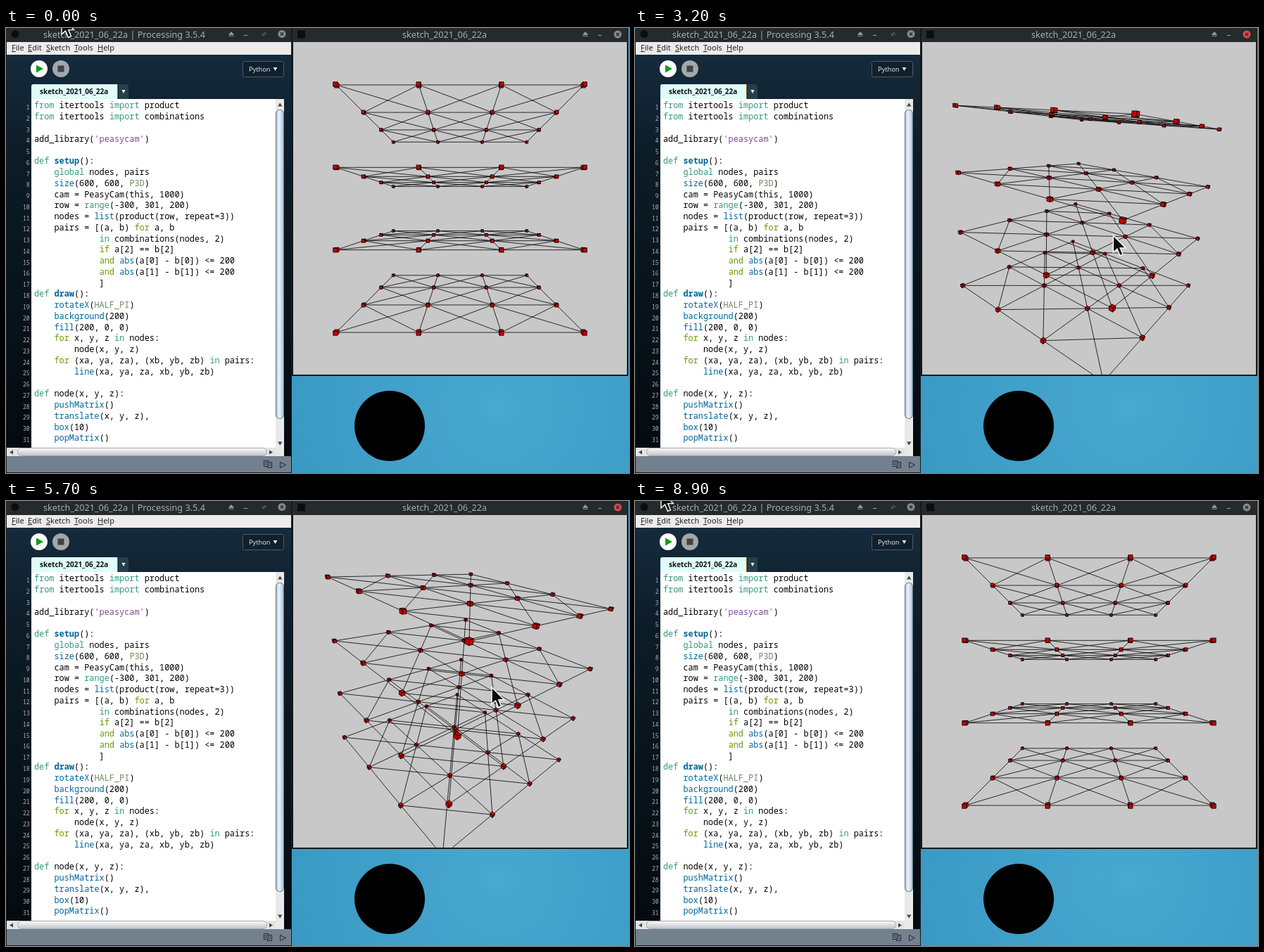
Animation of 885x633 px, one loop 9000 ms. Source, as an HTML page with a canvas:

```html
<!DOCTYPE html>
<html lang="en">
<head>
<meta charset="utf-8">
<title>Lattice sketch</title>
<style>
  html, body { margin: 0; width: 885px; height: 633px; overflow: hidden; background: #3b99c4; }
  svg, canvas, pre { position: absolute; left: 0; top: 0; margin: 0; }
  text { font-family: "Noto Sans", "Open Sans", sans-serif; }
  pre { font: 11.88px/15.77px "Noto Sans Mono", "DejaVu Sans Mono", monospace; color: #000; }
  #code { left: 40px; top: 102.4px; }
  #nums { top: 105px; width: 33.5px; text-align: right; font-size: 8px; color: #a9b6bd; }
  .word { color: #33997e; }
  .flow { color: #669900; }
  .call { color: #006699; }
  .main { color: #006699; font-weight: bold; }
  .name { color: #718a62; }
  .str { color: #7d4793; }
</style>
</head>
<body>
<svg width="885" height="633">
  <defs>
    <radialGradient id="desk" gradientUnits="userSpaceOnUse" cx="700" cy="540" r="330">
      <stop offset="0" stop-color="#48a8d0"/><stop offset="1" stop-color="#3998c2"/>
    </radialGradient>
    <linearGradient id="navy" x2="0" y2="1">
      <stop offset="0" stop-color="#152b3d"/><stop offset=".25" stop-color="#0c1c27"/><stop offset="1" stop-color="#040a0f"/>
    </linearGradient>
    <linearGradient id="thumb">
      <stop offset="0" stop-color="#a9bccb"/><stop offset=".4" stop-color="#edf5fb"/><stop offset="1" stop-color="#a5c0d6"/>
    </linearGradient>
    <linearGradient id="thumbH" x2="0" y2="1">
      <stop offset="0" stop-color="#fafafa"/><stop offset="1" stop-color="#bfc3c8"/>
    </linearGradient>
    <g id="tools" stroke="#9ba0a2" fill="none">
      <path d="M-49.500 9.500l3.500-4 3.500 4zM-49.500 11.500h7" fill="#9ba0a2" stroke-width=".8"/>
      <path d="M-28 10.500h5"/>
    </g>
  </defs>
  <rect width="885" height="633" fill="url(#desk)"/>
  <circle cx="545" cy="566" r="50" fill="#000"/>

  <!-- editor window -->
  <rect width="406" height="633" fill="#14191c"/>
  <rect width="405" height="20" fill="#252a2d"/>
  <circle cx="13" cy="8.500" r="5.500" fill="#0c0d0e"/>
  <text x="53" y="14" font-size="12.65" fill="#a9aeb0">sketch_2021_06_22a | Processing 3.5.4</text>
  <use href="#tools" x="366"/>
  <path d="M364.500 10.500l4-3.500M364.500 7.500v3h3M369 10V7h-3" stroke="#6d7274" stroke-width=".8" fill="none"/>
  <circle cx="392" cy="8.500" r="5.500" fill="#85898b"/>
  <path d="M390 6.500l4 4m0-4l-4 4" stroke="#252a2d" stroke-width="1.300"/>

  <rect x="1" y="20" width="404" height="18" fill="#edecea"/>
  <g font-size="11" fill="#222">
    <text x="8" y="32"><tspan text-decoration="underline">F</tspan>ile</text>
    <text x="31" y="32"><tspan text-decoration="underline">E</tspan>dit</text>
    <text x="57" y="32"><tspan text-decoration="underline">S</tspan>ketch</text>
    <text x="97" y="32"><tspan text-decoration="underline">T</tspan>ools</text>
    <text x="130" y="32"><tspan text-decoration="underline">H</tspan>elp</text>
  </g>

  <rect x="1" y="38" width="404" height="571" fill="url(#navy)"/>
  <circle cx="47" cy="58" r="12" fill="#fff"/>
  <path d="M43 52.500l10 5.500-10 5.500z" fill="#0a9f16"/>
  <circle cx="78" cy="58" r="12" fill="#a3a7aa"/>
  <rect x="73.500" y="53.500" width="9" height="9" fill="#3f4346"/>
  <rect x="336.500" y="47.500" width="58" height="22" rx="2" fill="#10202c" stroke="#4c5c68"/>
  <text x="345" y="62" font-size="9.200" fill="#e0e5e8">Python</text>
  <path d="M379.500 56h6l-3 5z" fill="#e0e5e8"/>
  <path d="M36 101V83q0-3 3-3h119v21z" fill="#dffcf8"/>
  <path d="M158.500 80v21" stroke="#a5672b"/>
  <path d="M160 80h11q3 0 3 3v18h-14z" fill="#24404f"/>
  <path d="M164.500 88h5l-2.500 5z" fill="#fff"/>
  <text x="48" y="94" font-size="10" font-weight="bold" fill="#111">sketch_2021_06_22a</text>

  <rect x="36" y="101" width="347" height="497" fill="#fff"/>
  <rect x="383" y="101" width="12" height="508" fill="#e9e9e9"/>
  <rect x="383.500" y="116.500" width="11" height="439" rx="5" fill="url(#thumb)" stroke="#5f7486"/>
  <path d="M386 111.500h6.500l-3.250-5zM386 588.500h6.500l-3.250 5z" fill="#444"/>
  <rect x="1" y="597" width="382" height="12" fill="#e4e4e4"/>
  <rect x="16.500" y="597.500" width="354" height="11" rx="5" fill="url(#thumbH)" stroke="#a4a8ac"/>
  <path d="M10 600.500v6l-5-3zM374 600.500v6l5-3z" fill="#444"/>
  <rect x="1" y="609" width="404" height="23" fill="#73808e"/>
  <g fill="none" stroke="#1f2a33">
    <path d="M366.500 615.500h6v8h-6zM372.500 617.500h5v8h-6v-2M368 618h3M368 620.500h3M374 620h2M374 622.500h2"/>
    <path d="M389.500 617.500v8l8-4z"/>
  </g>

  <!-- sketch window -->
  <rect x="406" width="478" height="495" fill="#14191c"/>
  <rect x="407" width="476" height="20" fill="#252a2d"/>
  <rect x="414" y="3.500" width="11" height="11" fill="#0c0d0e"/>
  <text x="563" y="14" font-size="12.65" fill="#a9aeb0">sketch_2021_06_22a</text>
  <use href="#tools" x="869"/>
  <circle id="close" cx="869" cy="9" r="5.500"/>
  <path d="M867 7l4 4m0-4l-4 4" stroke="#252a2d" stroke-width="1.300"/>
</svg>
<pre id="nums"></pre>
<pre id="code">from itertools import product
from itertools import combinations

add_library('peasycam')

def setup():
    global nodes, pairs
    size(600, 600, P3D)
    cam = PeasyCam(this, 1000)
    row = range(-300, 301, 200)
    nodes = list(product(row, repeat=3))
    pairs = [(a, b) for a, b
             in combinations(nodes, 2)
             if a[2] == b[2]
             and abs(a[0] - b[0]) &lt;= 200
             and abs(a[1] - b[1]) &lt;= 200
             ]
def draw():
    rotateX(HALF_PI)
    background(200)
    fill(200, 0, 0)
    for x, y, z in nodes:
        node(x, y, z)
    for (xa, ya, za), (xb, yb, zb) in pairs:
        line(xa, ya, za, xb, yb, zb)

def node(x, y, z):
    pushMatrix()
    translate(x, y, z),
    box(10)
    popMatrix()</pre>
<canvas id="view" width="474" height="473" style="left:408px;top:20px"></canvas>
<svg width="885" height="633">
  <path id="cursor" d="M0 0V24L5.500 19L9.500 28.500L13.500 26.800L9.700 17.600H17.500Z" fill="#0a0a0a" stroke="#fff" stroke-width="1.400"/>
</svg>
<script>
const $ = id => document.getElementById(id);
const g = $('view').getContext('2d');

// syntax colours
const groups = {
  str: "'\\w+'",
  word: '\\b(?:from|import|def|global|range|in)\\b',
  flow: '\\b(?:for|if|and)\\b',
  main: '\\b(?:setup|draw)\\b',
  name: '\\b(?:P3D|HALF_PI)\\b',
  call: '\\b(?:size|list|abs|rotateX|background|fill|line|pushMatrix|translate|box|popMatrix)\\b'
};
const lexer = new RegExp(Object.entries(groups).map(([k, re]) => `(?<${k}>${re})`).join('|'), 'g');
$('code').innerHTML = $('code').innerHTML.replace(lexer, (...m) => {
  const kind = Object.entries(m.at(-1)).find(e => e[1])[0];
  return `<span class="${kind}">${m[0]}</span>`;
});
$('nums').textContent = Array.from({ length: 31 }, (_, i) => i + 1).join('\n');

// lattice: nodes and links inside each horizontal plane
const row = [-300, -100, 100, 300];
const nodes = row.flatMap(x => row.flatMap(y => row.map(z => [x, y, z])));
const pairs = [];
nodes.forEach((a, i) => nodes.slice(i + 1).forEach(b => {
  if (a[1] === b[1] && Math.abs(a[0] - b[0]) <= 200 && Math.abs(a[2] - b[2]) <= 200) pairs.push([a, b]);
}));

// time, then orientation quaternion (w, x, y, z)
const front = [1, 0, 0, 0], above = [.8485, -.5144, .1242, .0194], tilted = [.796, .202, -.559, .11],
      corner = [.8936, -.1998, -.3761, .1415], low = [.9588, .0652, -.2759, .0017];
const poses = [[0, front], [1500, front], [2400, above], [2500, above], [3700, tilted], [4200, tilted],
  [5200, corner], [5700, corner], [6600, low], [7300, low], [7700, front], [9000, front]];
const pointer = [[0, [79, -15]], [1400, [79, -15]], [1500, [643, 211]], [2400, [659, 269]], [2500, [659, 269]],
  [3700, [694, 314]], [4200, [694, 314]], [5200, [690, 265]], [5700, [690, 265]], [6600, [658, 301]],
  [6700, [655, 297]], [7900, [655, 297]], [8100, [193, 41]], [8200, [120, -50]], [8400, [20, -50]],
  [8500, [23, -16]], [8600, [33, -16]], [8700, [33, -16]], [8900, [37, -14]], [9000, [79, -15]]];

function at(keys, t, mix) {
  const i = keys.findIndex((k, n) => n && t < k[0]);
  const [[t0, a], [t1, b]] = [keys[i - 1], keys[i]];
  return mix(a, b, (t - t0) / (t1 - t0));
}
const lerp = (a, b, p) => a.map((v, i) => v + (b[i] - v) * p);
function slerp(a, b, p) {
  const angle = Math.acos(Math.min(1, a.reduce((s, v, i) => s + v * b[i], 0)));
  if (angle < .03) return lerp(a, b, p);
  return a.map((v, i) => (v * Math.sin((1 - p) * angle) + b[i] * Math.sin(p * angle)) / Math.sin(angle));
}
function rotation(q) {
  const n = Math.hypot(...q), [w, x, y, z] = q.map(v => v / n);
  return [
    [1 - 2 * (y * y + z * z), 2 * (x * y - w * z), 2 * (x * z + w * y)],
    [2 * (x * y + w * z), 1 - 2 * (x * x + z * z), 2 * (y * z - w * x)],
    [2 * (x * z - w * y), 2 * (y * z + w * x), 1 - 2 * (x * x + y * y)]
  ];
}

const FOCAL = 410.8, DIST = 1000;
function drawLattice(R) {
  const turn = p => R.map(r => r[0] * p[0] + r[1] * p[1] + r[2] * p[2]);
  const project = p => {
    const [x, y, z] = turn(p), k = FOCAL / (DIST - z);
    return [237 + x * k, 237 + y * k];
  };
  g.fillStyle = '#c8c8c8';
  g.fillRect(0, 0, 474, 473);
  g.strokeStyle = '#000';
  g.lineJoin = 'round';
  g.lineWidth = .8;
  g.beginPath();
  for (const [a, b] of pairs) {
    g.moveTo(...project(a));
    g.lineTo(...project(b));
  }
  g.stroke();

  g.fillStyle = '#c80000';
  const depth = p => turn(p)[2];
  for (const p of [...nodes].sort((a, b) => depth(a) - depth(b))) {
    const c = turn(p);
    for (let axis = 0; axis < 3; axis++) {
      // of each pair of opposite faces only one can look at the camera
      const facing = R[2][axis] * DIST - R.reduce((s, r, i) => s + r[axis] * c[i], 0);
      const side = facing > 0 ? 5 : -5;
      if (Math.abs(facing) < 5) continue;
      g.beginPath();
      for (const [u, v] of [[-5, -5], [5, -5], [5, 5], [-5, 5]]) {
        const q = [...p];
        q[axis] += side;
        q[(axis + 1) % 3] += u;
        q[(axis + 2) % 3] += v;
        g.lineTo(...project(q));
      }
      g.closePath();
      g.fill();
      g.stroke();
    }
  }
}

function frame(now) {
  const t = Math.floor(now % 9000 / 100) * 100;
  drawLattice(rotation(at(poses, t, slerp)));
  $('cursor').setAttribute('transform', `translate(${at(pointer, t, lerp)})`);
  $('close').setAttribute('fill', t >= 1600 && t < 8800 ? '#d8494c' : '#85898b');
  requestAnimationFrame(frame);
}
frame(0);
</script>
</body>
</html>
```
